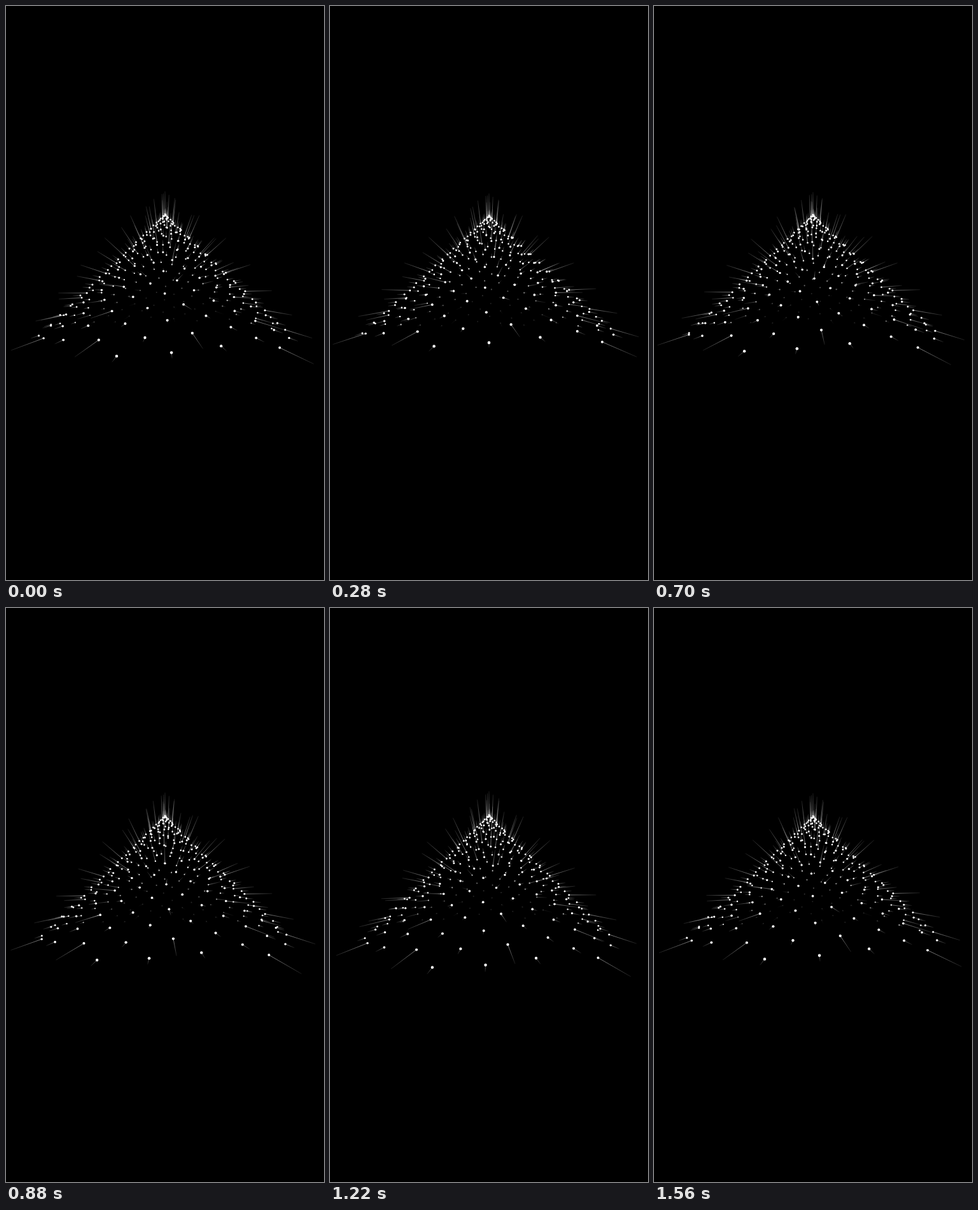
An HTML page with a canvas for the animation above (1.58 s loop, 500x900 px).

```html
<!DOCTYPE html>
<html lang="en">
<head>
<meta charset="utf-8">
<title>Cone of pins</title>
<style>
  html, body { margin: 0; width: 100%; height: 100%; overflow: hidden; background: #000; }
  canvas { display: block; }
</style>
</head>
<body>
<canvas id="stage" width="500" height="900"></canvas>
<script>
const ctx = document.getElementById('stage').getContext('2d');
const LOOP = 1580, STEP = 20;
const COUNT = 300, RISE = 0.6, APEX = -120;
const FOCAL = 432, DISTANCE = 420, WOBBLE = 0.06;
const LONG = 35, SHORT = 10;

// One pin per radian around a 45° cone; each tail points away from the pivot.
const pins = Array.from({ length: COUNT }, (_, i) => {
  const r = i * RISE;
  const head = [r * Math.sin(i), APEX + r, r * Math.cos(i)];
  const isLong = i % 4 === 0;
  const stretch = 1 + (isLong ? LONG : SHORT) / Math.hypot(...head);
  return { head, tip: head.map(v => v * stretch), isLong };
});

function project([x, y, z], yaw, pitch) {
  const x1 = x * Math.cos(yaw) + z * Math.sin(yaw);
  const z1 = z * Math.cos(yaw) - x * Math.sin(yaw);
  const y1 = y * Math.cos(pitch) - z1 * Math.sin(pitch);
  const z2 = z1 * Math.cos(pitch) + y * Math.sin(pitch);
  const scale = FOCAL / (DISTANCE - z2);
  return { x: 250 + x1 * scale, y: 450 + y1 * scale, z: z2, scale };
}

function drawTail(a, b, strength) {
  const fade = ctx.createLinearGradient(a.x, a.y, b.x, b.y);
  fade.addColorStop(0, `rgba(255,255,255,${strength})`);
  fade.addColorStop(1, `rgba(255,255,255,${strength * 0.2})`);
  ctx.strokeStyle = fade;
  ctx.beginPath();
  ctx.moveTo(a.x, a.y);
  ctx.lineTo(b.x, b.y);
  ctx.stroke();
}

function draw(time) {
  const phase = time / LOOP * 2 * Math.PI;
  const yaw = WOBBLE * Math.cos(phase);
  const pitch = WOBBLE * Math.sin(phase);

  ctx.globalAlpha = 1;
  ctx.fillStyle = '#000';
  ctx.fillRect(0, 0, 500, 900);
  ctx.fillStyle = '#fff';
  ctx.lineWidth = 0.9;

  for (const { head, tip, isLong } of pins) {
    const a = project(head, yaw, pitch);
    const b = project(tip, yaw, pitch);
    // The far side sinks into the dark.
    ctx.globalAlpha = Math.min(1, Math.max(0.13, 1 + (a.z + 55) / 75));
    drawTail(a, b, isLong ? 0.55 : 0.45);
    ctx.beginPath();
    ctx.arc(a.x, a.y, 1.3 * a.scale, 0, 2 * Math.PI);
    ctx.fill();
  }
}

function tick() {
  draw(Math.floor(performance.now() % LOOP / STEP) * STEP);
  requestAnimationFrame(tick);
}
tick();
</script>
</body>
</html>
```
